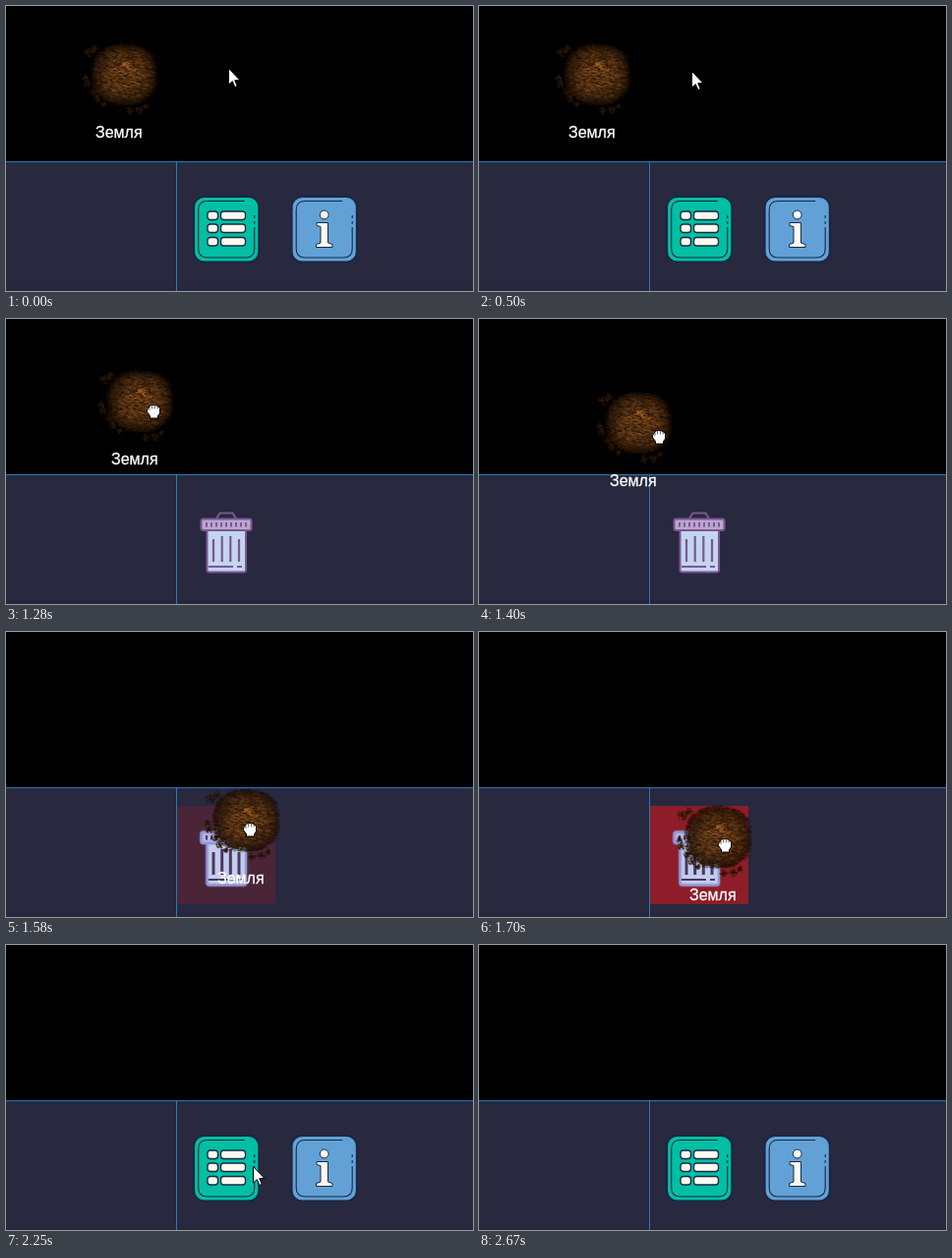
Animation, 475 px wide and 290 px high, one loop 3170 ms. Source, as an HTML page with a canvas:

```html
<!DOCTYPE html>
<html lang="ru">
<head>
<meta charset="utf-8">
<style>
  html, body { margin: 0; width: 100%; height: 100%; overflow: hidden; background: #000; }
  canvas { display: block; }
</style>
</head>
<body>
<canvas id="stage" width="475" height="290"></canvas>
<script>
const LOOP = 3170, STEP = 60;
const GRAB = 1100, DRAG = 1220, HOVER = 1520, DROP = 2250, EXIT = 2670;
const INK = '#1a2744', CREAM = '#fffaf0';
const ctx = document.getElementById('stage').getContext('2d', { alpha: false });

// Each key is [time, x, y]
const POINTER = [
  [440, 227, 64], [500, 217, 67], [920, 127, 75], [1100, 127, 76], [1160, 127, 76],
  [1220, 134, 81], [1400, 183, 120], [1580, 248, 201], [1700, 250, 217], [1820, 249, 222],
  [2250, 252, 226], [2670, 373, 302]
];
const SOIL_SHIFT = [
  [1160, 0, 0], [1220, 3, 3], [1400, 42, 36], [1580, 124, 122], [1700, 123, 139], [1820, 122, 146]
];

function at(keys, t) {
  const next = keys.findIndex(k => k[0] > t);
  if (next === 0) return keys[0].slice(1);
  if (next < 0) return keys[keys.length - 1].slice(1);
  const a = keys[next - 1], b = keys[next], p = (t - a[0]) / (b[0] - a[0]);
  return [a[1] + (b[1] - a[1]) * p, a[2] + (b[2] - a[2]) * p];
}

// The pointer is sampled every 60 ms, restarting at the drop
function sampled(t) {
  if (t < 500) return 0;
  const start = t < DROP ? 500 : DROP;
  return start + STEP * Math.floor((t - start) / STEP);
}

function shape(path, fill, stroke, width = 1.3) {
  const p = typeof path === 'string' ? new Path2D(path) : path;
  if (fill) { ctx.fillStyle = fill; ctx.fill(p); }
  if (stroke) { ctx.strokeStyle = stroke; ctx.lineWidth = width; ctx.stroke(p); }
}

function box(x, y, w, h, r, fill, stroke, width) {
  const p = new Path2D();
  p.roundRect(x, y, w, h, r);
  shape(p, fill, stroke, width);
}

function disc(x, y, r, fill, stroke, width) {
  const p = new Path2D();
  p.arc(x, y, r, 0, Math.PI * 2);
  shape(p, fill, stroke, width);
}

function makeSoil() {
  const canvas = document.createElement('canvas');
  canvas.width = 80;
  canvas.height = 80;
  const c = canvas.getContext('2d');
  let seed = 41;
  const rnd = () => (seed = seed * 16807 % 2147483647) / 2147483647;
  const clods = [
    [8, 11, 5], [14, 7, 4], [7, 42, 4], [5, 36, 3], [14, 50, 5], [18, 58, 4],
    [24, 63, 3], [50, 70, 4], [60, 69, 4], [66, 65, 3]
  ];
  const grain = (x, y, w, h, light, alpha) => {
    c.fillStyle = `hsla(${25 + rnd() * 6}, 62%, ${light}%, ${alpha})`;
    c.fillRect(x, y, w, h);
  };
  const depth = (x, y) =>
    Math.abs((x - 44) / 34) ** 2.4 + Math.abs((y - 33) / 32) ** 2.4;

  for (let i = 0; i < 5200; i++) {
    const x = 9 + rnd() * 69, y = rnd() * 66, d = depth(x, y);
    if (d < 0.75 + rnd() * 0.3)
      grain(x, y, 2, 1.5, 5 + rnd() * 8, Math.min(0.8, Math.max(0.1, 1.15 - d)));
  }
  for (const [x, y, r] of clods)
    for (let i = 0; i < r * 13; i++) {
      const a = rnd() * 6.3, q = rnd() * r;
      grain(x + Math.cos(a) * q, y + Math.sin(a) * q, 1.6, 1.4, 4 + rnd() * 13, 0.45);
    }
  // Slightly tilted streaks, brightest in the middle
  c.rotate(0.12);
  for (let i = 0; i < 3000; i++) {
    const x = 10 + rnd() * 72, y = rnd() * 68 - 7;
    const d = depth(x * 0.993 - y * 0.12, x * 0.12 + y * 0.993);
    if (d < 0.97)
      grain(x, y, 1.5 + rnd() * 3.5, 0.8 + rnd() * 0.7, 6 + (1 - d) * (4 + rnd() * 30),
        Math.min(0.7, 1.2 - d));
  }
  c.resetTransform();
  for (let i = 0; i < 24; i++)
    grain(43 + rnd() * 7, 20 + rnd() * 5, 1.5, 1.5, 34 + rnd() * 14, 0.6);
  return canvas;
}
const soil = makeSoil();

function drawRoom() {
  ctx.fillStyle = '#000';
  ctx.fillRect(0, 0, 475, 158);
  ctx.fillStyle = '#28283f';
  ctx.fillRect(0, 158, 475, 132);
  ctx.fillStyle = '#26263c';
  ctx.fillRect(0, 286, 475, 4);
  ctx.fillStyle = '#1f7db5';
  ctx.fillRect(0, 158, 475, 1);
  ctx.fillRect(173, 158, 1, 132);
}

function drawButton(x, color) {
  box(x + 0.5, 194, 66, 66.5, 10.5, color, INK, 1.8);
  shape(`M${x + 52} 198.5H${x + 14}Q${x + 5} 198.5 ${x + 5} 207.5V247Q${x + 5} 256 ${x + 14} 256
    H${x + 53}Q${x + 62} 256 ${x + 62} 247V225M${x + 62} 213v3M${x + 62} 219v3`, null, INK, 1.1);
}

function drawButtons() {
  drawButton(190.7, '#00bfa2');
  for (const y of [209, 222, 235.5]) {
    box(205, y, 10.5, 8.5, 3, CREAM, INK);
    box(218.5, y, 25, 8.5, 3, CREAM, INK);
  }
  drawButton(290.2, '#62a1d6');
  disc(323.7, 212.5, 4.4, CREAM, INK, 1);
  shape('M316 220.5H327.5V241L332 242.5V245.5H315.5V242.5L320 241V224.5L316 223.5Z', CREAM, INK, 1);
}

function drawBin(hover) {
  const line = hover ? '#9497d3' : '#7b5794';
  const slot = hover ? '#4d3566' : '#7b5794';
  ctx.save();
  if (hover) { ctx.shadowColor = '#8f96d8'; ctx.shadowBlur = 2; }
  shape('M214 203L217.5 197.5H230.5L234 203', null, line, 2);
  box(204.5, 214, 39.5, 43.5, 2, hover ? '#c2cdea' : '#c3d5ef', line, 2);
  box(198.5, 203.5, 51, 11.5, 2, hover ? '#b4b6dd' : '#baa6cf', line, 2);
  ctx.restore();
  for (let x = 204; x < 247; x += 5) shape(`M${x} 207v4.5`, null, slot, 2);
  for (const x of [211, 219.7, 228.3, 237]) {
    const top = x === 211 || x === 237 ? 224 : 221;
    shape(`M${x} ${top}V247`, null, slot, hover ? 3 : 2.2);
  }
  shape('M206 252H231M235 252H240', null, slot, 2);
}

function drawSoil(t) {
  const [dx, dy] = at(SOIL_SHIFT, t).map(Math.round);
  ctx.drawImage(soil, 75 + dx, 36 + dy);
  ctx.font = '16px "Liberation Sans", Arial, sans-serif';
  ctx.fillStyle = ctx.strokeStyle = '#fff';
  ctx.lineWidth = 0.3;
  ctx.fillText('Земля', 91 + dx, 134 + dy);
  ctx.strokeText('Земля', 91 + dx, 134 + dy);
}

function drawHand() {
  const palm = 'M-6 -1.5Q-6.5 -4 -4.2 -4V-5Q-3 -7 -1.5 -6Q0 -7.5 1.5 -6Q3 -7 4.3 -5' +
    'Q6.5 -5 6.5 -2.5V2L4.5 4.5V7H-3.5V4.5L-6.5 0.5Q-7 -1.5 -6 -1.5Z';
  shape(palm, '#fff', '#000', 1);
  shape('M-4 -4V-1M-1.5 -5.5V-2.5M1.5 -5.5V-2.5M4.2 -4.5V-2.5', null, '#333', 0.7);
}

function drawPointer(t) {
  const [x, y] = at(POINTER, t).map(Math.round);
  ctx.save();
  ctx.translate(x, y);
  if (t >= GRAB && t < DROP) drawHand();
  else shape('M-.5 -.5V16L3.3 12.6L5.8 18.5L8.2 17.4L5.8 11.6H11Z', '#fff', '#000', 1);
  ctx.restore();
}

function draw(time) {
  const t = sampled(time);
  const dragging = t >= DRAG && t < DROP;
  drawRoom();
  if (dragging) {
    const heat = Math.min(1, Math.max(0, (t - HOVER) / 300));
    ctx.globalAlpha = heat;
    ctx.fillStyle = '#d0171a';
    ctx.fillRect(174, 177, 100, 100);
    ctx.globalAlpha = 1;
    drawBin(heat > 0);
  } else {
    drawButtons();
  }
  if (t < DROP) drawSoil(t);
  if (t < EXIT) drawPointer(t);
}

const start = performance.now();
function tick() {
  draw((performance.now() - start) % LOOP);
  requestAnimationFrame(tick);
}
tick();
</script>
</body>
</html>
```
